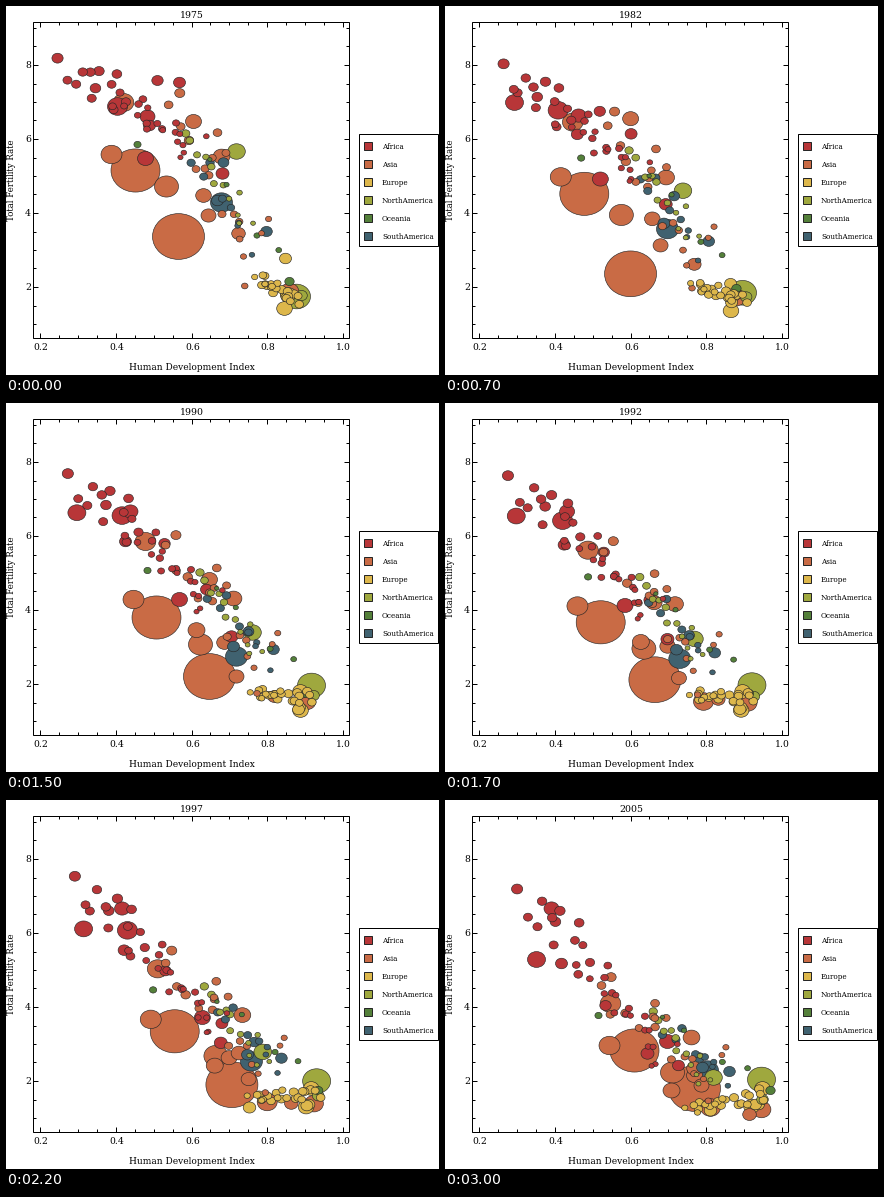
A matplotlib script for the animation above (3.1 s loop, 433 by 369 pixels).

```python
import numpy as np
import matplotlib.pyplot as plt
from matplotlib.animation import FuncAnimation
from matplotlib.collections import LineCollection
from matplotlib.patches import Ellipse, Rectangle

W, H, DPI = 433, 369, 64
PX = 72 / DPI  # points per pixel
FIRST_YEAR, LAST = 1975, 30
FLATTEN = 0.88  # bubble height over width
INK = "#262626"
COLORS = {
    "Africa": "#b83638",
    "Asia": "#c96b45",
    "Europe": "#ddb74b",
    "NorthAmerica": "#9fa83e",
    "Oceania": "#54803a",
    "SouthAmerica": "#406270",
}

rng = np.random.default_rng(5)
plt.rcParams["font.family"] = "DejaVu Serif"
fig = plt.figure(figsize=(W / DPI, H / DPI), dpi=DPI, facecolor="white")
ax = fig.add_axes([0, 0, 1, 1])
ax.set_xlim(0, W)
ax.set_ylim(H, 0)
ax.axis("off")


def text(x, y, s, size=9.3, **kw):
    kw = {"ha": "center", "va": "center_baseline", **kw}
    return ax.text(x, y, s, fontsize=size * PX, color="black", **kw)


def box(x0, y0, x1, y1, fill="none", edge="black"):
    ax.add_patch(Rectangle((x0, y0), x1 - x0, y1 - y0, facecolor=fill,
                           edgecolor=edge, lw=PX, zorder=2))


# --- chart frame, ticks, labels ---
LEFT, TOP, RIGHT, BOTTOM = 27, 16, 343, 332
box(LEFT, TOP, RIGHT, BOTTOM)
ticks = []
for i in range(17):
    hdi = 0.2 + 0.05 * i
    x, n = round(34 + (hdi - 0.2) * 378.75), 3 if i % 4 else 5
    ticks += [[(x, BOTTOM), (x, BOTTOM - n)], [(x, TOP), (x, TOP + n)]]
    if i % 4 == 0:
        text(x + 0.5, 341, f"{hdi:.1f}")
for i in range(2, 19):
    y, n = round(355 - 18.5 * i), 3 if i % 4 else 5
    ticks += [[(LEFT, y), (LEFT + n, y)], [(RIGHT, y), (RIGHT - n, y)]]
    if i % 4 == 0:
        text(22, y, str(i // 2))
ax.add_collection(LineCollection(ticks, colors="black", linewidths=PX))

text(185.5, 360, "Human Development Index", 9)
text(6, 174, "Total Fertility Rate", 8.6, rotation=90, va="center")
title = text(186, 8, "", 9.4)

# --- legend ---
box(353, 128, 432, 240, "white")
for i, (name, color) in enumerate(COLORS.items()):
    y = 140 + 18 * i
    box(358, y - 4, 366, y + 4, color, INK)
    text(376, y, name, 7.2, ha="left")

# --- bubbles ---
bubbles = []


def bubble(region, r, points, wobble=0, span=(0, LAST)):
    """A country that passes evenly timed points during its span of years."""
    dot = Ellipse((0, 0), 2 * r, 2 * r * FLATTEN, facecolor=COLORS[region],
                  edgecolor=INK, lw=0.6 * PX, zorder=3 + 1 / r)
    ax.add_patch(dot)
    years = np.linspace(*span, len(points))
    phase = rng.uniform(0, 2 * np.pi, 2)
    bubbles.append((dot, years, np.array(points), wobble, phase))


def swarm(region, n, radii, start, end, spread):
    """Small countries strung along a line that drifts from start to end."""
    (a0, b0), (a1, b1) = np.array(start), np.array(end)
    for i in range(n):
        u = (i + rng.uniform()) / n
        shift = rng.uniform(-spread, spread, 2)
        r = np.interp(u, [0, 1], radii) * rng.uniform(0.85, 1.1)
        bubble(region, r, [a0 + (b0 - a0) * u + shift,
                           a1 + (b1 - a1) * u + shift], wobble=1.5)


swarm("Africa", 32, (5.2, 2.8), [(62, 62), (192, 142)], [(82, 95), (225, 262)], 17)
swarm("Asia", 18, (4.8, 3), [(175, 95), (265, 255)], [(165, 190), (290, 275)], 25)
swarm("Europe", 22, (3.6, 4.6), [(250, 270), (292, 294)], [(240, 308), (319, 294)], 6)
swarm("NorthAmerica", 12, (4.3, 2.3), [(178, 118), (248, 225)], [(208, 205), (266, 287)], 12)
swarm("Oceania", 4, (2.2, 3.6), [(195, 135), (284, 268)], [(206, 205), (318, 282)], 5)
swarm("SouthAmerica", 8, (4.8, 2.6), [(190, 145), (245, 242)], [(222, 225), (282, 278)], 8)

# large countries
bubble("Africa", 10, [(111, 100), (114, 107), (124, 140)], span=(0, 26))
bubble("Africa", 9, [(69, 96), (71, 115), (91, 159)], span=(7, LAST))
bubble("Africa", 8, [(139, 152), (173, 196), (222, 241)])
bubble("Africa", 7.5, [(141, 110), (124, 108), (106, 108)])
bubble("Africa", 6.5, [(216, 167), (225, 233), (202, 253)])
bubble("Africa", 6, [(143, 119), (119, 138), (116, 163)])
bubble("Africa", 6, [(173, 76), (200, 186), (233, 265)])
bubble("Africa", 5.7, [(151, 74), (158, 140), (160, 205)])

bubble("Asia", 26, [(172, 230), (186, 270), (203, 273), (227, 285), (249, 288)])
bubble("Asia", 24.5, [(129, 164), (150, 214), (189, 250)])
bubble("Asia", 12, [(160, 180), (194, 241), (227, 272)])
bubble("Asia", 10.5, [(105, 148), (127, 196), (164, 245)])
bubble("Asia", 10.3, [(117, 96), (139, 138), (165, 203)])
bubble("Asia", 10, [(258, 298), (265, 307)], span=(17, LAST))
bubble("Asia", 9.4, [(283, 285), (300, 298), (316, 309)])
bubble("Asia", 8.5, [(182, 209), (206, 262), (226, 290)], span=(12, LAST))
bubble("Asia", 8.4, [(215, 150), (227, 195), (246, 237)])
bubble("Asia", 8, [(187, 115), (185, 112), (203, 176), (224, 263), (249, 275)])
bubble("Asia", 7.8, [(197, 189), (218, 239), (249, 268)])
bubble("Asia", 7.5, [(202, 209), (230, 273), (256, 285)])
bubble("Asia", 6.8, [(232, 227), (268, 293), (304, 314)])

bubble("Europe", 7.8, [(278, 302), (294, 307), (306, 306)])
bubble("Europe", 7.8, [(282, 288), (294, 288), (317, 288)])
bubble("Europe", 6, [(280, 289), (293, 304), (313, 304)])
bubble("Europe", 6, [(279, 252), (292, 306), (310, 304)])
bubble("Europe", 6.3, [(243, 307), (265, 310)], span=(22, LAST))

bubble("NorthAmerica", 14, [(290, 290), (305, 282), (316, 279)])
bubble("NorthAmerica", 8.8, [(230, 145), (246, 229), (268, 277)])
bubble("NorthAmerica", 5.8, [(295, 289), (307, 292), (317, 299)])

bubble("Oceania", 4.7, [(283, 275), (300, 290), (325, 290)])
bubble("Oceania", 3.6, [(131, 138), (141, 167), (153, 215)])

bubble("SouthAmerica", 11, [(215, 196), (230, 253), (262, 270)])
bubble("SouthAmerica", 6, [(211, 194), (227, 243), (257, 267)])
bubble("SouthAmerica", 5.8, [(260, 225), (267, 246), (284, 271)])
bubble("SouthAmerica", 5.4, [(217, 156), (242, 228), (254, 257)])


def draw(year):
    title.set_text(str(FIRST_YEAR + year))
    for dot, years, path, wobble, phase in bubbles:
        dot.set_visible(years[0] <= year <= years[-1])
        dx, dy = wobble * np.sin(4 * np.pi * year / LAST + phase) + 0.5
        dot.center = (np.interp(year, years, path[:, 0]) + dx,
                      np.interp(year, years, path[:, 1]) + dy)
    return [title] + [b[0] for b in bubbles]


anim = FuncAnimation(fig, draw, frames=LAST + 1, interval=100,
                     repeat=True, repeat_delay=0)
plt.show()
```
